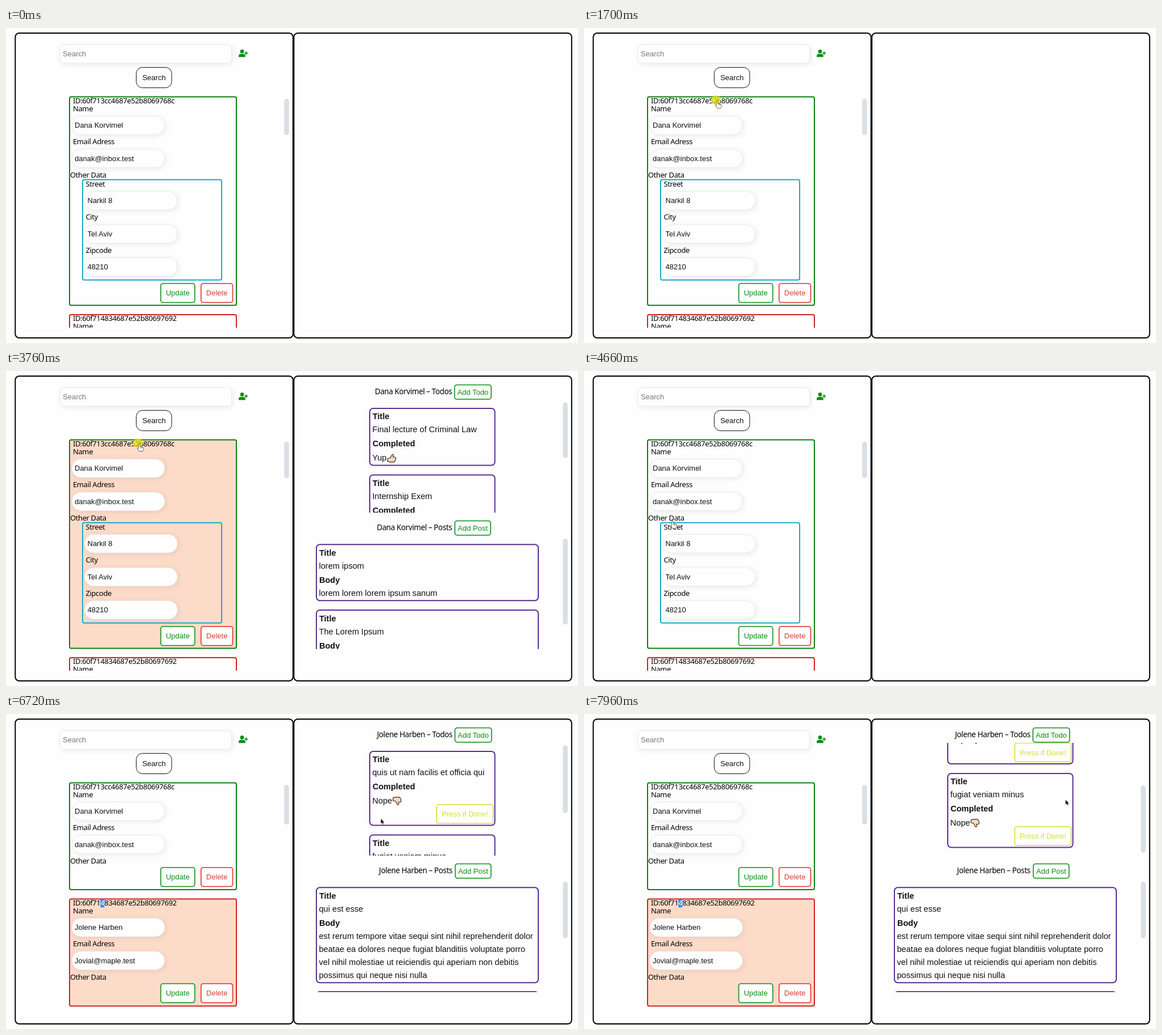
An HTML page that plays this animation: 1008x556 px, repeating every 8000 ms.

```html
<!DOCTYPE html>
<html lang="en">
<head>
<meta charset="utf-8">
<title>User manager</title>
<style>
html, body { margin: 0; width: 100%; height: 100%; overflow: hidden; background: #fefefe; }
svg { display: block; width: 1008px; height: 556px; font-family: "Liberation Sans", Arial, sans-serif; fill: #111; }
text { white-space: pre; }
.label { font-family: "Noto Sans", sans-serif; letter-spacing: -.4px; fill: #000; }
.bold { font-weight: 700; }
.box { fill: none; stroke-width: 2; }
.white { fill: #fefefe; }
.field { fill: #fefefe; stroke: #e9e9e9; filter: drop-shadow(2px 2px 5px rgba(0, 0, 0, .08)); }
.thumb { fill: #d9dfe4; }

/* state changes */
.card1, .card2, .details, .fold, .below, .bar, .hover, .on1, .on2, .sel, .glow, .arrow, .hand, .beam {
  animation: 8s step-end infinite;
}
.card1 { animation-name: pick1, shrink; }
.card2 { animation-name: pick2; }
.details { animation-name: hide; }
.fold { animation-name: fold; }
.below { transform: translateY(384.5px); animation-name: below; }
.bar { animation-name: bar; }
.hover { animation-name: hover; }
.on1, .on2, .sel, .glow, .arrow, .hand, .beam { visibility: hidden; }
.on1 { animation-name: on1; }
.on2 { animation-name: on2; }
.sel { animation-name: sel; }
.glow { animation-name: glow; }
.arrow { animation-name: arrow; }
.hand { animation-name: hand; }
.beam { animation-name: beam; }
@keyframes pick1 { 23% { fill: #fddbc9; } 48.75% { fill: #fefefe; } }
@keyframes pick2 { 77.1%, to { fill: #fddbc9; } }
@keyframes shrink { 64.875%, to { height: 188.5px; } }
@keyframes hide { 64.875%, to { visibility: hidden; } }
@keyframes fold { 64.875%, to { transform: translateY(-180px); } }
@keyframes below { 64.875%, to { transform: translateY(205px); } }
@keyframes bar { 64.875%, to { height: 70px; } }
@keyframes hover { 13.5% { fill: #eee; } 17% { fill: #fefefe; } }
@keyframes on1 { 23% { visibility: visible; } 48.75% { visibility: hidden; } }
@keyframes on2 { 77.1%, to { visibility: visible; } }
@keyframes sel { 75.375%, to { visibility: visible; } }
@keyframes glow {
  21.1%, 46.9%, 74.5% { visibility: visible; }
  23%, 48.75%, 77.1% { visibility: hidden; }
}
@keyframes arrow { 4.875%, 81%, to { visibility: visible; } 13.5% { visibility: hidden; } }
@keyframes hand { 13.5%, 72.5% { visibility: visible; } 69.5%, 81% { visibility: hidden; } }
@keyframes beam { 69.5% { visibility: visible; } 72.5% { visibility: hidden; } }

/* movement */
.pointer { animation: move 8s linear infinite; }
.todos { animation: scroll 8s ease-in-out infinite; }
.todoBar { animation: slide 8s ease-in-out infinite; }
@keyframes move {
  0%, 4.875% { transform: translate(828px, 502px); animation-timing-function: ease-in-out; }
  14.375% { transform: translate(252px, 94px); }
  15% { transform: translate(250px, 96px); }
  18.75% { transform: translate(238px, 135px); }
  20.8%, 48.75% { transform: translate(235px, 128px); animation-timing-function: ease-in-out; }
  58.2%, 60.75% { transform: translate(156px, 264px); }
  62.5%, 64.875% { transform: translate(153px, 264px); animation-timing-function: ease-in-out; }
  70.5%, 71.3% { transform: translate(148.5px, 372px); animation-timing-function: ease-in-out; }
  74.5%, 78.1% { transform: translate(168px, 334px); animation-timing-function: ease-in-out; }
  84%, 85.6% { transform: translate(660.5px, 184.5px); animation-timing-function: ease-in-out; }
  90.6% { transform: translate(858px, 143px); }
  96% { transform: translate(856px, 141px); }
  99.5%, to { transform: translate(848.5px, 151px); }
}
@keyframes scroll { 0%, 87% { transform: none; } 95.2%, to { transform: translateY(-108.5px); } }
@keyframes slide { 0%, 87% { transform: none; } 95.2%, to { transform: translateY(70.5px); } }
</style>
</head>
<body>
<svg id="stage" viewBox="0 0 1008 556"></svg>
<script>
const GREEN = '#0a8f14', RED = '#e02c2c', PURPLE = '#5a2d91', LIME = '#d5dc34';

// y is the middle of the capitals
const text = (x, y, s, size = 13, attrs = '') =>
  `<text x="${x}" y="${y + size * .355}" font-size="${size}" ${attrs}>${s}</text>`;
const label = (x, y, s, attrs = '') => text(x, y, s, 13, `class="label" ${attrs}`);
const rect = (x, y, w, h, r, attrs = '') =>
  `<rect x="${x}" y="${y}" width="${w}" height="${h}" rx="${r}" ${attrs}/>`;
const group = (cls, ...parts) => `<g class="${cls}">${parts.join('')}</g>`;
const clip = (id, ...parts) => `<g clip-path="url(#${id})">${parts.join('')}</g>`;
const clipBox = (id, x, y, w, h) => `<clipPath id="${id}">${rect(x, y, w, h, 0)}</clipPath>`;

const button = (x, y, w, h, s, color, ink = color) =>
  rect(x, y, w, h, 4, `class="white" stroke="${color}" stroke-width="1.6"`) +
  text(x + w / 2, y + h / 2, s, 13, `text-anchor="middle" fill="${ink}"`);
const field = (x, y, name, value) =>
  label(x + 2, y - 13, name) +
  rect(x, y + .5, 163.5, 32.5, 16.2, 'class="field"') +
  text(x + 5, y + 16.7, value);
const thumb = (x, y, h, cls = '') => rect(x, y, 8.6, h, 4.3, `class="thumb ${cls}"`);

const userTop = (id, name, mail) =>
  label(118, 128.3, id, 'data-id') + field(116, 155, 'Name', name) +
  field(116, 213.5, 'Email Adress', mail) + label(113, 259, 'Other Data');
const userButtons = () =>
  button(272.7, 451, 60, 33.5, 'Update', GREEN) +
  button(343.7, 451, 55.8, 33.5, 'Delete', RED, '#d8402f');
const userBox = (h, color, cls) =>
  rect(112, 121.5, 294, h, 3, `class="box white ${cls}" stroke="${color}"`);

const HAND_SIGN = 'M5.5 7.5L8.5 2.5Q9 .6 10.4 1.2Q11.8 2 10.6 6H14Q15.6 6.4 15 8Q16 9.5 14.7 10.6' +
  'Q15 12.2 13.8 12.8Q13.5 14.5 12 14.7H6Q4 14.7 1 13.5V8.5Z';
const sign = (x, y, up) =>
  `<path d="${HAND_SIGN}" transform="translate(${x} ${y}) scale(1 ${up ? 1 : -1})"
    fill="#f9d9bd" stroke="#33261e" stroke-width="1.2" stroke-linejoin="round"/>`;

const box = (x, y, w, h) => rect(x, y, w, h, 6, `class="box" stroke="${PURPLE}"`);
const heading = (x, y, s) => text(x, y, s, 14.5, 'class="bold"');
const line = (x, y, s) => text(x, y, s, 14.6);

function todo(y, title, done) {
  return box(641, y + 1, 220.5, done ? 100.5 : 130.5) +
    heading(646, y + 15, 'Title') + line(645.5, y + 38.3, title) +
    heading(646, y + 63.3, 'Completed') + line(645.5, y + 88.3, done ? 'Yup' : 'Nope') +
    (done ? sign(671.5, y + 81, true)
      : sign(681, y + 96.5, false) + button(759, y + 94.8, 99.5, 33.2, 'Press if Done!', LIME));
}
function post(y, title, body) {
  return box(547, y + 1, 391, 76 + body.length * 23) +
    heading(552, y + 15.5, 'Title') + line(551.5, y + 38.7, title) +
    heading(552, y + 63.7, 'Body') +
    body.map((s, i) => line(551.5, y + 86.8 + i * 23, s)).join('');
}
const titles = (name, dx) => [['Todo', 24.5, 790.5, 64.5], ['Post', 264.5, 791, 63]].map(([s, y, x, w]) =>
  text(786 + dx, y + 12.2, `${name} – ${s}s`, 13.5, 'class="label" text-anchor="end"') +
  button(x + dx, y, w, 25.3, `Add ${s}`, GREEN)).join('');

const dana = 'Dana Korvimel', jolene = 'Jolene Harben';
const stage = document.getElementById('stage');

stage.innerHTML = `<defs>
  ${clipBox('users', 90, 112, 395, 417)}
  ${clipBox('todoView', 620, 50.5, 260, 199.5)}
  ${clipBox('postView', 530, 300, 430, 190.7)}
  </defs>` +
  [17, 508].map(x => rect(x - .7, 9, 489.5, 538, 7,
    'class="box" stroke="#000" stroke-width="2.2"')).join('') +

  rect(95, 29.5, 302.5, 32.5, 7, 'class="field"') +
  text(100, 45, 'Search', 13, 'fill="#77776c"') +
  `<g fill="${GREEN}"><circle cx="416" cy="41.4" r="3.4"/>
    <path d="M410 51.2V49.5Q410 46 413.5 45.8H418Q421.8 46 421.8 49.5V51.2Z"/>
    <path d="M420.2 44.4H426.2M423.2 41.4V47.4" stroke="${GREEN}" stroke-width="1.7"/></g>` +
  rect(229.5, 69.5, 62.5, 36, 11, 'class="hover white" stroke="#111"') +
  text(260.8, 87.6, 'Search', 13, 'text-anchor="middle"') +
  thumb(490.2, 125, 64, 'bar') +

  clip('users',
    userBox(368, '#0a800f', 'card1'),
    userTop('ID:60f713cc4687e52b8069768c', dana, 'danak@inbox.test'),
    group('details',
      rect(135, 267.8, 245, 177, 3, 'class="box" stroke="#14aec6"'),
      field(138.5, 288, 'Street', 'Narkil 8'),
      field(138.5, 346.7, 'City', 'Tel Aviv'),
      field(138.5, 405, 'Zipcode', '48210')),
    group('fold', userButtons()),
    group('below',
      userBox(189, '#cf2222', 'card2'),
      userTop('ID:60f714834687e52b80697692', jolene, 'Jovial@maple.test'),
      '<g id="selection" class="sel"></g>',
      `<g transform="translate(0 -180)">${userButtons()}</g>`)) +

  group('on1', titles(dana, 0),
    clip('todoView',
      todo(65, 'Final lecture of Criminal Law', true),
      todo(182.5, 'Internship Exem', true)),
    clip('postView',
      post(305.3, 'lorem ipsom', ['lorem lorem lorem ipsum sanum']),
      post(421, 'The Lorem Ipsum', ['lorem'])),
    thumb(981.3, 55.5, 98), thumb(981.3, 296, 151.5)) +

  group('on2', titles(jolene, .7),
    clip('todoView', group('todos',
      todo(65, 'quis ut nam facilis et officia qui', false),
      todo(212.5, 'fugiat veniam minus', false))),
    clip('postView',
      post(305.3, 'qui est esse', [
        'est rerum tempore vitae sequi sint nihil reprehenderit dolor',
        'beatae ea dolores neque fugiat blanditiis voluptate porro',
        'vel nihil molestiae ut reiciendis qui aperiam non debitis',
        'possimus qui neque nisi nulla']),
      post(489, '', [''])),
    thumb(981.3, 55.5, 119, 'todoBar'), thumb(981.3, 296, 100)) +

  group('pointer',
    '<circle class="glow" cx="-2.5" cy="-.5" r="8.5" fill="#f0e500" opacity=".72"/>',
    `<path class="arrow" d="M0 0V9.3L2.2 7.4L3.8 10.8L5.3 10.1L3.8 6.9H6.6Z"
      fill="#000" stroke="#fff" stroke-width=".5"/>`,
    `<path class="hand" d="M-1.2 1Q0-.6 1.2 1V5.5L4 6Q7.4 6.3 7.4 8.5V10Q7.2 12 6 13.6H0L-3.4 9Q-3.5 7.4-1.2 8.6Z
      M2.8 6V8.5M5 6.4V8.7" fill="#fff" stroke="#555" stroke-width=".9"/>`,
    `<path class="beam" d="M-2.5-5.8Q0-5.8 0-4.6Q0-5.8 2.5-5.8M0-4.6V4.6M-2.5 5.8Q0 5.8 0 4.6Q0 5.8 2.5 5.8"
      fill="none" stroke="#333" stroke-width="1"/>`);

// mark the selected digit of the second ID
const digit = stage.querySelectorAll('[data-id]')[1].getExtentOfChar(8);
document.getElementById('selection').innerHTML =
  rect(digit.x, 121.8, digit.width, 14.5, 0, 'fill="#2f8fe8"') +
  label(digit.x, 128.3, '4', 'style="fill:#fff"');
</script>
</body>
</html>
```
